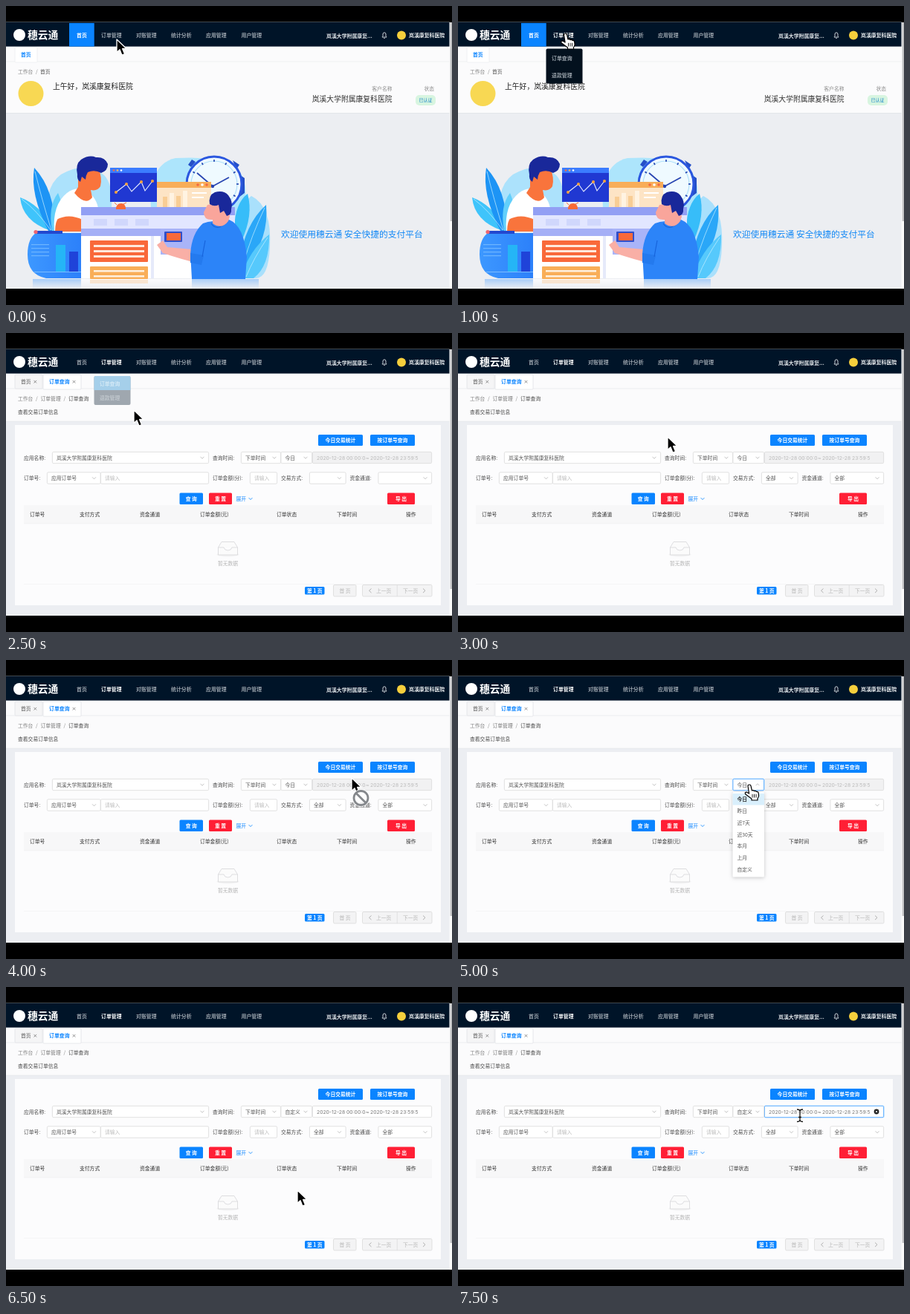
These frames come from a looping animation (600x403 px, 8000 ms). An HTML page with a canvas:

```html
<!DOCTYPE html>
<html lang="zh">
<head>
<meta charset="utf-8">
<title>订单查询</title>
<style>
html, body { margin: 0; width: 100%; height: 100%; overflow: hidden; background: #000; }
canvas { display: block; }
</style>
</head>
<body>
<canvas id="stage" width="600" height="403"></canvas>
<script>
const ctx = document.getElementById('stage').getContext('2d');
const CJK = '"Noto Sans CJK SC", "Noto Sans CJK", sans-serif';
const BRAND = '穗云通';
const CLIENT = '岚溪大学附属康复科医院';
const SHORT = '岚溪康复科医院';
const BLUE = '#0a84ff', RED = '#ff1f35', NAVY = '#001428', PAPER = '#fbfbfc', GREY = '#eceef2';
const LOOP = 8000, STEP = 500;

// One entry per half second: pointer kind, position and page state.
const steps = [
  { cur: 'arrow', x: 149, y: 45 },
  { cur: 'hand', x: 143, y: 38, hover: 1 },
  { cur: 'hand', x: 142.5, y: 37, hover: 1, menu: 1 },
  { cur: 'hand', x: 143, y: 54, hover: 1, menu: 1 },
  { cur: 'hand', x: 142, y: 68, hover: 2, menu: 2, link: 1 },
  { cur: 'arrow', x: 172, y: 104, order: 1, fade: 1 },
  { cur: 'arrow', x: 282, y: 140, order: 1, loaded: 1 },
  { cur: 'arrow', x: 420, y: 156, order: 1, loaded: 1 },
  { cur: 'ban', x: 465, y: 159, order: 1, loaded: 1 },
  { cur: 'hand', x: 393, y: 165, order: 1, loaded: 1 },
  { cur: 'hand', x: 390, y: 168, order: 1, loaded: 1, open: 1, pick: 0 },
  { cur: 'hand', x: 387, y: 190, order: 1, loaded: 1, open: 1, pick: 0 },
  { cur: 'hand', x: 387, y: 278, order: 1, loaded: 1, open: 1, pick: 6 },
  { cur: 'arrow', x: 392, y: 274, order: 1, loaded: 1, custom: 1 },
  { cur: 'beam', x: 452, y: 171, order: 1, loaded: 1, custom: 1, focus: 1 },
  { cur: 'beam', x: 460, y: 173, order: 1, loaded: 1, custom: 1, focus: 1 }
];

function rect(x1, y1, x2, y2, color) {
  ctx.fillStyle = color;
  ctx.fillRect(x1, y1, x2 - x1, y2 - y1);
}
function box(x1, y1, x2, y2, r, fill, line) {
  ctx.beginPath();
  ctx.roundRect(x1, y1, x2 - x1, y2 - y1, r);
  if (fill) { ctx.fillStyle = fill; ctx.fill(); }
  if (line) { ctx.strokeStyle = line; ctx.lineWidth = 0.8; ctx.stroke(); }
}
function disc(x, y, r, fill, line, width = 1) {
  ctx.beginPath();
  ctx.arc(x, y, r, 0, Math.PI * 2);
  if (fill) { ctx.fillStyle = fill; ctx.fill(); }
  if (line) { ctx.strokeStyle = line; ctx.lineWidth = width; ctx.stroke(); }
}
function shape(d, fill, line, width = 1) {
  const p = new Path2D(d);
  if (fill) { ctx.fillStyle = fill; ctx.fill(p); }
  if (line) { ctx.strokeStyle = line; ctx.lineWidth = width; ctx.stroke(p); }
}
// y is the middle of the glyphs
function text(s, x, y, color, size = 6.8, weight = 400, align = 'left', family = CJK) {
  ctx.font = `${weight} ${size}px ${family}`;
  ctx.textAlign = align;
  ctx.fillStyle = color;
  ctx.fillText(s, x, y + size * 0.38);
}
function clipped(s, x, y, right, color) {
  ctx.save();
  ctx.beginPath();
  ctx.rect(x, y - 6, right - x, 12);
  ctx.clip();
  text(s, x, y, color, 6.8, 400, 'left', 'Inter, sans-serif');
  ctx.restore();
}
function caret(x, y, color = '#b5b5b5', up = false) {
  const k = up ? -1 : 1;
  shape(`M${x - 2.4} ${y - 1.2 * k}L${x} ${y + 1.3 * k}L${x + 2.4} ${y - 1.2 * k}`, null, color, 0.8);
}
function cross(x, y, r, color) {
  shape(`M${x - r} ${y - r}L${x + r} ${y + r}M${x + r} ${y - r}L${x - r} ${y + r}`, null, color, 0.8);
}
function button(x1, y1, x2, y2, label, color) {
  box(x1, y1, x2, y2, 1.5, color);
  text(label, (x1 + x2) / 2, (y1 + y2) / 2, '#fff', 6.8, 700, 'center');
}
function fade(x1, y1, x2, y2, from, to, down) {
  const g = ctx.createLinearGradient(x1, y1, down ? x1 : x2, down ? y2 : y1);
  g.addColorStop(0, from);
  g.addColorStop(1, to);
  return g;
}

function header(s) {
  rect(0, 21, 597, 22, '#43494f');
  rect(0, 22, 597, 54.6, NAVY);
  disc(18, 39, 8, '#fff');
  text(BRAND, 29, 39, '#fff', 13.8, 700);
  if (!s.order) rect(85, 23, 118.7, 54.6, BLUE);
  const items = ['首页', '订单管理', '对账管理', '统计分析', '应用管理', '用户管理'];
  const left = [95, 128, 175, 222, 269, 316.5];
  items.forEach((label, i) => {
    let color = '#9aa3ac';
    if (i === 0 && !s.order) color = '#fff';
    if (i === 1 && (s.order || s.hover)) color = s.hover === 2 ? '#1689ff' : '#fff';
    text(label, left[i], 39, color, 6.9, 700);
  });
  text(CLIENT.slice(0, 8) + '...', 431, 40, '#e0e4e8', 6.9, 700);
  shape('M506 42H512L511 40.5V38Q511 35.8 509 35.8T507 38V40.5ZM508.2 43.4H509.8', null, '#e2e5e8', 0.9);
  disc(532, 39.5, 6, '#f6cf3c');
  text(SHORT, 542, 39, '#eceff1', 6.9, 700);
}

function scrollbar(end) {
  rect(596.5, 22, 600, 381, '#fafafa');
  rect(597.6, 22, 600, end, '#c0c1c3');
}

function home() {
  rect(0, 54, 600, 145, PAPER);
  rect(0, 74.6, 597, 75.3, '#e9eaec');
  box(12, 55.5, 42, 76, 1, '#fff', '#eceef0');
  text('首页', 20, 65.5, BLUE, 6.8, 700);
  text('工作台', 16, 88, '#858585');
  text('/', 40, 88, '#858585');
  text('首页', 46, 88, '#505050');
  disc(33.5, 118, 17, '#f8d853');
  text('上午好，' + SHORT, 63, 107.8, '#1d1d1d', 9.8);
  text('客户名称', 519.5, 111, '#8b8b8b', 6.8, 400, 'right');
  text(CLIENT, 519.5, 125.6, '#303030', 9.8, 400, 'right');
  text('状态', 576, 111, '#8b8b8b', 6.8, 400, 'right');
  box(551, 120, 578, 134, 5, '#d8f5e0');
  text('已认证', 564.5, 127, '#1683c9', 6, 400, 'center');
  rect(0, 144, 597, 381, GREY);
  rect(0, 144, 597, 144.7, '#dfe2e6');
  art();
  text('欢迎使用' + BRAND + ' 安全快捷的支付平台', 370, 308, '#1489f5', 11.75);
}

function art() {
  // backdrop
  shape('M58 300Q48 246 74 227Q108 208 132 228Q144 240 142 272V300Z', '#ace2fc');
  shape('M196 285Q188 214 228 205Q262 203 296 208Q326 222 322 262L318 300Z', '#ade5fc');
  shape('M310 367Q306 276 330 256Q358 270 355 325Q353 367 336 367Z', '#a9e0fc');

  // leaves
  shape('M60 303Q22 290 19 258Q46 268 62 298Z', '#3fc4fb');
  shape('M57 303Q32 254 38 218Q66 248 66 303Z', '#1d94f5');
  shape('M62 303Q56 270 70 252Q82 280 70 303Z', '#62cffb');
  shape('M307 300Q308 266 325 253Q333 282 317 316Z', '#37bdf9');
  shape('M314 345Q321 294 350 268Q354 313 324 350Z', '#2aa7f8');
  shape('M315 367Q328 328 354 308Q355 350 333 367Z', '#56c9fc');
  shape('M39 223Q48 260 61 302M21 260Q42 276 60 302M348 272Q330 310 320 345M352 312Q333 340 323 365', null, '#c6efff', 0.7);

  // clock
  shape('M305 208L314 214L310 220ZM315 228L321 232V252L313 258ZM245 214L250 207L255 210L249 217Z', '#2550c8');
  disc(280, 240, 37, '#effaff', '#2b57df', 3);
  disc(280, 240, 31, null, '#b0e0fb', 1.2);
  for (let i = 0; i < 12; i++) {
    const a = i * Math.PI / 6, c = Math.cos(a), n = Math.sin(a);
    shape(`M${280 + c * 30} ${240 + n * 30}L${280 + c * 33} ${240 + n * 33}`, null, '#2445b0', 1.6);
  }
  shape('M257 225L278 243L300 231', null, '#2845b2', 1.8);
  disc(278, 243, 2.2, '#2845b2');

  // windows
  rect(203, 237, 276, 272, '#fde4c5');
  rect(203, 237, 276, 245, '#f8ad58');
  [258, 264, 270].forEach((x, i) => disc(x, 241, 1.8, i === 1 ? '#fff' : '#f4683f'));
  [[211, 257], [220, 252], [229, 256], [238, 249]].forEach(([x, y], i) => rect(x, y, x + 6, 271, i % 2 ? '#fff3e2' : '#f8cd95'));
  rect(250, 251, 270, 253, '#fff');
  rect(250, 257, 266, 259, '#fff');
  rect(140, 219, 203, 264, '#2038d2');
  rect(140, 218, 203, 225, '#3b7cff');
  ['#f4683f', '#f9b25e', '#fff'].forEach((c, i) => disc(145 + i * 5, 221.5, 1.3, c));
  const pts = [[148, 251], [162, 240], [169, 250], [182, 237], [187, 249], [197, 236]];
  shape('M' + pts.map(p => p.join(' ')).join('L'), null, '#e9efff', 1.1);
  pts.filter(p => p[1] !== 250 && p[1] !== 249).forEach(([x, y]) => disc(x, y, 2, '#f9a23e'));

  // left person
  shape('M65 304Q62 268 82 252Q92 244 104 247Q120 254 124 272L122 304Z', '#fff');
  shape('M97 222L124 218Q130 232 127 243Q123 250 114 248L116 258Q107 270 92 252L97 244Z', '#f9743c');
  shape('M96 227Q93 213 101 207Q112 200 121 204Q133 203 137 213Q137 222 128 225Q119 220 110 224Q107 229 107 234L102 230L100 237Q95 234 96 227Z', '#19289a');
  shape('M72 283Q88 276 104 283L122 294V304H66Q66 290 72 283Z', '#f9743c');
  shape('M68 288L72 281Q88 274 105 284L103 288Q84 279 68 288Z', '#fff');

  // blue base and bars
  shape('M40 306H150V367H54Q29 362 29 335Q29 314 40 306Z', fade(29, 306, 105, 306, '#3d98ff', '#2b7ffa'));
  rect(40, 303, 76, 307, '#2348cf');
  for (let y = 321; y < 340; y += 5) rect(34, y, 58, y + 1.2, '#6db5ff');
  rect(67, 322, 80, 358, '#25b5f6');
  rect(85, 331, 97, 358, '#1f43d9');
  rect(38, 358, 101, 359, '#7cbcff');
  disc(40, 304.5, 2.6, '#ee6570');

  // desk
  rect(101, 271, 308, 282, '#929ff4');
  rect(101, 282, 308, 301, '#e2e6ff');
  for (let x = 118; x < 200; x += 28) rect(x, 287, x + 18, 296, '#d0d7fc');
  rect(101, 300, 212, 310, '#a5aff6');
  rect(101, 310, 265, 367, '#fff');
  rect(208, 300, 265, 335, '#a9b4f8');
  rect(195, 310, 199, 367, '#e6eafa');
  box(113, 316, 191, 345, 1, '#f9693a');
  [322, 329, 336].forEach(y => rect(118, y, 186, y + 3, '#ffe9dc'));
  box(113, 351, 191, 368, 1, '#f9ae58');
  rect(118, 356, 186, 358.5, '#fff1de');
  rect(118, 363, 186, 365.5, '#fff1de');
  shape('M148 274Q148 266 155 266Q161 266 161 274Z', '#f96a35');
  shape('M149 268L146 265M158 267L162 265', null, '#f96a35', 1);

  // right person
  box(213, 304, 237, 318, 1, '#314fca');
  rect(216, 306, 235, 316, '#f9693a');
  shape('M203 322L211 316L217 325L250 328L262 331L256 346Q238 342 211 333Z', '#f9afa6');
  shape('M248 334Q250 306 265 293Q275 289 284 291L300 288Q320 296 324 338L322 368H250L249 350Z', '#2c84f8');
  shape('M248 333L266 336L263 349L248 346Z', '#247aee');
  shape('M264 338L268 316M276 293Q284 305 298 290', null, '#1764dc', 1.2);
  shape('M271 268L297 264L301 284L299 290Q290 302 278 293V288Q266 289 266 278Z', '#f9a59b');
  shape('M274 267Q272 255 281 251Q293 248 299 255Q306 264 303 274Q304 281 297 283L293 276L288 279L286 268Q280 271 274 267Z', '#19289a');

  // floor reflection
  rect(36, 368, 101, 381, fade(0, 368, 0, 381, '#a9cdf8', GREY, true));
  rect(101, 368, 250, 381, fade(0, 368, 0, 381, '#fbfbfd', GREY, true));
  rect(113, 369, 191, 374, '#f8e4d0');
  rect(250, 368, 340, 381, fade(0, 368, 0, 381, '#a9cdf8', GREY, true));
}

function submenu(s) {
  box(118.5, 57.6, 167.5, 104.5, 2, '#03111e');
  text('订单查询', 126, 70, s.menu === 2 ? '#fff' : '#9ba4ac', 6.9, 700);
  text('退款管理', 126, 93, '#98a1a9', 6.9, 700);
}
function fadingMenu() {
  box(118.5, 58, 167.5, 97, 2, '#9fa7af');
  box(118.5, 58, 167.5, 77, [2, 2, 0, 0], '#a5cfea');
  text('订单查询', 126, 68, '#d4e9f6', 6.8, 700);
  text('退款管理', 126, 87, '#c0c7cd', 6.8, 700);
}

function field(x1, x2, y, label, opt = {}) {
  const line = opt.focus ? '#3a9cff' : '#dadada';
  if (opt.focus) box(x1 - 0.8, y - 8.6, x2 + 0.8, y + 8.6, 2, '#d4eaff');
  box(x1 + 0.4, y - 7.7, x2 - 0.4, y + 7.7, 1.5, opt.fill || '#fff', line);
  if (label) text(label, x1 + 6, y, opt.color || '#555');
  if (!opt.plain) caret(x2 - 9, y, '#b5b5b5', opt.focus);
}

function orders(s) {
  rect(0, 54, 597, 119, PAPER);
  rect(0, 119, 597, 381, GREY);
  rect(0, 118.7, 597, 119.4, '#e2e4e8');
  rect(0, 74.6, 597, 75.3, '#e3e5e8');
  box(12, 56, 49, 75, 1, '#f5f5f6', '#e1e3e6');
  box(50, 56, 101, 76, 1, '#fff', '#e1e3e6');
  text('首页', 20, 65.5, '#555');
  cross(39.3, 65.7, 1.8, '#777');
  text('订单查询', 58, 65.5, BLUE, 6.9, 700);
  cross(91.5, 65.7, 1.8, '#777');
  text('工作台', 16, 88, '#858585');
  text('/', 40, 88, '#858585');
  text('订单管理', 46.5, 88, '#777');
  text('/', 77.5, 88, '#858585');
  text('订单查询', 84, 88, '#454545');
  text('查看交易订单信息', 16, 106, '#4a4a4a');
  rect(12, 124, 585, 367, '#fcfcfd');

  button(420, 137, 480, 152, '今日交易统计', BLUE);
  button(490, 137, 550, 152, '按订单号查询', BLUE);

  const labels = [['应用名称:', 24, 168], ['查询时间:', 278, 168], ['订单号:', 24, 195.5],
    ['订单金额(分):', 278, 195.5], ['交易方式:', 370, 195.5], ['资金通道:', 462.5, 195.5]];
  labels.forEach(([t, x, y]) => text(t, x, y, '#4a4a4a'));
  field(62, 273, 168, CLIENT);
  field(316, 370, 168, '下单时间');
  field(412, 573, 168, '', { plain: 1, focus: s.focus, fill: s.custom ? '#fff' : '#f1f1f2' });
  field(369.5, 412, 168, s.custom ? '自定义' : '今日', { focus: s.open });
  const ink = s.custom ? '#777' : '#b9b9b9';
  clipped('2020-12-28 00:00:00', 418, 168, 483.5, ink);
  text('~', 484, 168, ink, 6.8, 400, 'left', 'Inter, sans-serif');
  clipped('2020-12-28 23:59:59', 490, 168, 554, ink);
  if (s.focus) {
    disc(563, 168, 3.4, '#222');
    cross(563, 168, 1.2, '#fff');
  }
  const hint = { plain: 1, color: '#bdbdbd' };
  field(127, 273, 195.5, '请输入', hint);
  field(55, 127.5, 195.5, '应用订单号');
  field(328, 365, 195.5, '请输入', hint);
  field(408, 457.5, 195.5, s.loaded ? '全部' : '');
  field(500.5, 573, 195.5, s.loaded ? '全部' : '');

  button(233.5, 215.5, 265, 231, '查 询', BLUE);
  button(273, 215.5, 304, 231, '重 置', RED);
  text('展开', 309.5, 223, BLUE);
  caret(329, 223.3, BLUE);
  button(513, 215.5, 550, 231, '导 出', RED);

  rect(24, 232, 573, 257, '#f7f7f8');
  rect(24, 256.6, 573, 257.2, '#ebebed');
  [['订单号', 32], ['支付方式', 99], ['资金通道', 180], ['订单金额(元)', 261],
    ['订单状态', 364], ['下单时间', 445], ['操作', 538]].forEach(([t, x]) => text(t, x, 244, '#333', 6.8, 500));

  ctx.beginPath();
  ctx.ellipse(298.5, 298.5, 15, 3, 0, 0, 7);
  ctx.fillStyle = '#f2f2f3';
  ctx.fill();
  shape('M285.5 289L290 281.5H307L311.5 289V299H285.5ZM285.5 289H293Q294 293 298.5 293T304 289H311.5', '#fbfbfb', '#d6d6d8', 0.8);
  text('暂无数据', 298.5, 310, '#b4b4b4', 6.8, 400, 'center');
  rect(24, 338.5, 573, 339, '#ececee');

  button(402, 342, 428.5, 352.5, '第 1 页', BLUE);
  box(440.5, 339.5, 471, 355, 1.5, '#f3f3f4', '#dadada');
  text('首 页', 456, 347.3, '#b5b5b5', 6.8, 400, 'center');
  box(479.5, 339.5, 573, 355, 1.5, '#f3f3f4', '#dadada');
  rect(525.8, 339.5, 526.5, 355, '#dadada');
  text('上一页', 498, 347.3, '#b5b5b5');
  text('下一页', 534, 347.3, '#b5b5b5');
  shape('M491.5 344.5L488.5 347.3L491.5 350.1M561 344.5L564 347.3L561 350.1', null, '#a9a9a9', 0.9);
  if (s.open) choices(s.pick);
}

function choices(pick) {
  ctx.save();
  ctx.shadowColor = 'rgba(0,0,0,.22)';
  ctx.shadowBlur = 5;
  ctx.shadowOffsetY = 1;
  box(369.5, 178, 412, 292.5, 1.5, '#fff');
  ctx.restore();
  ['今日', '昨日', '近7天', '近30天', '本月', '上月', '自定义'].forEach((t, i) => {
    const y = 187.7 + i * 15.75;
    if (i === pick) rect(369.5, y - 7.8, 412, y + 7.8, '#d9effc');
    text(t, 375.5, y, i === 0 ? '#333' : '#555', 6.8, i === 0 ? 700 : 400);
  });
}

function pointer(s) {
  ctx.save();
  ctx.translate(s.x, s.y);
  ctx.lineJoin = 'round';
  if (s.cur === 'arrow' || s.cur === 'ban') {
    shape('M0 0V17.5L4 13.8L7 21.2L10.6 19.7L7.6 12.5H13Z', '#000', '#fff', 1.3);
  }
  if (s.cur === 'ban') {
    disc(12.5, 27, 9.5, null, '#fff', 4.6);
    disc(12.5, 27, 9.5, 'rgba(255,255,255,.55)', '#85888c', 2.8);
    shape('M6 20.5L19 33.5', null, '#85888c', 2.8);
  }
  if (s.cur === 'hand') {
    shape('M0 2Q0 0 2 0T4.3 2.8L5.5 8Q7.3 7 8.5 8.6Q10.4 7.8 11.5 9.5Q13.7 9 14.2 11.4L14.6 15Q14.2 17.5 13 18.7V21H5V19L-3.4 12.7Q-4.5 10 -1.7 10L1.6 12Z', '#fff', '#000', 1.2);
    shape('M6 12.8V17.5M8.5 12.8V17.5M11 12.8V17.5', null, '#000', 0.9);
  }
  if (s.cur === 'beam') {
    const d = 'M-4 -8Q0 -8 0 -5.5Q0 -8 4 -8M0 -5.5V6M-4 8.5Q0 8.5 0 6Q0 8.5 4 8.5M-2 2.5H2';
    shape(d, null, '#fff', 2.8);
    shape(d, null, '#111', 1.3);
  }
  ctx.restore();
}

function draw(time) {
  const s = steps[Math.floor((time % LOOP) / STEP)];
  rect(0, 0, 600, 403, '#000');
  if (s.order) orders(s); else home();
  header(s);
  scrollbar(s.order ? 345 : 290);
  if (s.menu) submenu(s);
  if (s.fade) fadingMenu();
  if (s.link) {
    rect(0, 375.5, 68, 383, '#34373b');
    text('localhost:9229/order/list', 1.5, 379.7, '#e8e8e8', 6.1, 400, 'left', '"Open Sans", sans-serif');
  }
  pointer(s);
}

let start;
function tick(now) {
  if (start === undefined) start = now;
  draw(now - start);
  requestAnimationFrame(tick);
}
draw(0);
requestAnimationFrame(tick);
</script>
</body>
</html>
```
